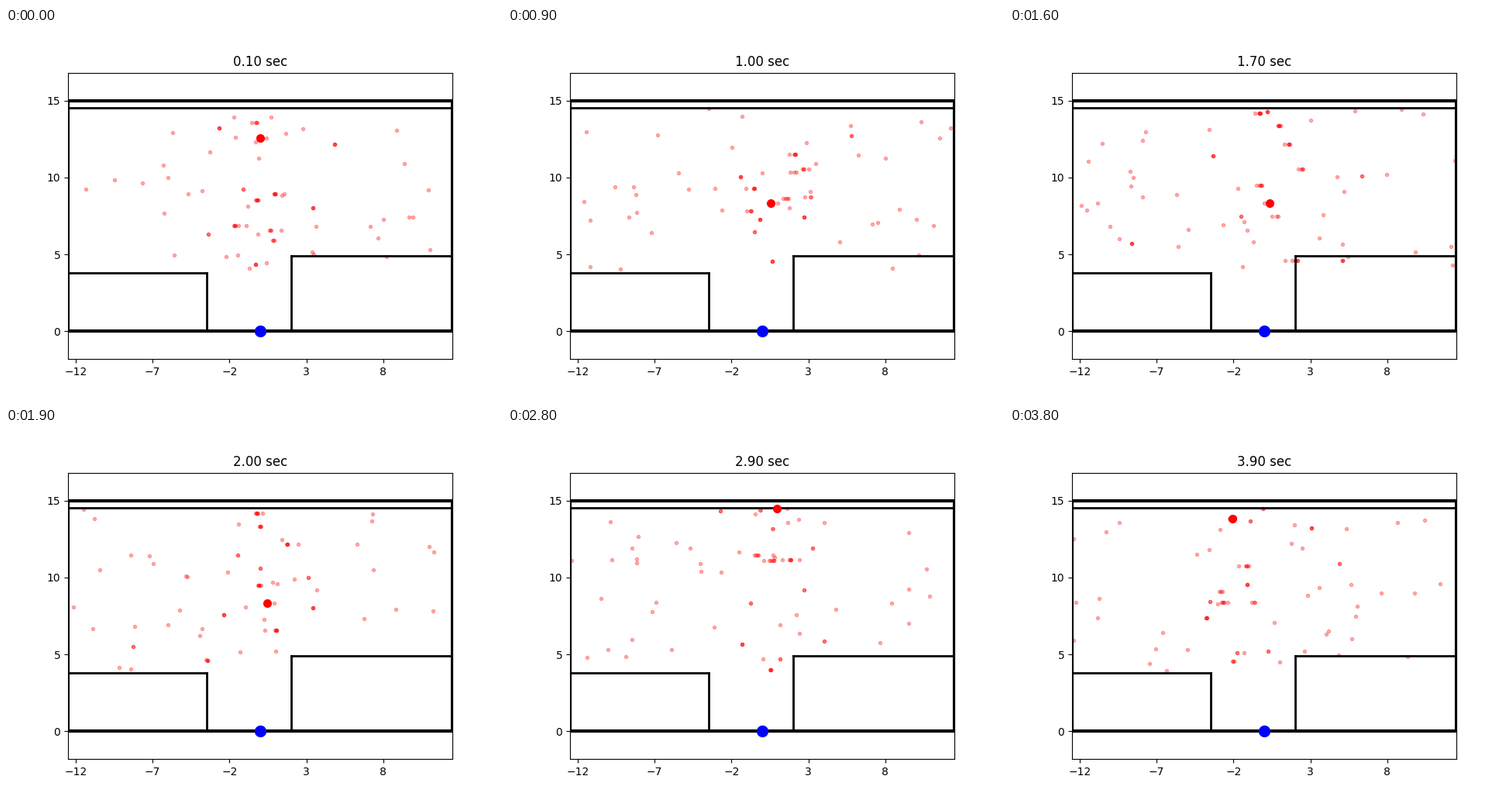
A matplotlib script for the animation above (3.9 s loop, 640x480 px).

```python
import numpy as np
import matplotlib.pyplot as plt
from matplotlib.animation import FuncAnimation

FRAMES = 39
INTERVAL = 100
HALF = 12.5
CEILING = 14.53
Y_LOW, Y_HIGH = 3.85, 14.5
SINGLES = 38
PAIRS = 6
GROUPS = 48

# Key points of the best estimate: frame, x, y
KEYS = np.array([
    (0, 0, 12.56),
    (9, 0.57, 8.33),
    (13, 0.22, 8.33),
    (19, 0.47, 8.33),
    (24, -1.8, 14.5),
    (32, 3.75, 9.87),
    (38, -2.05, 13.8),
])


def best_at(k):
    """Drift along x, but jump to the height of the nearest key."""
    frames, xs, ys = KEYS.T
    return np.interp(k, frames, xs), ys[np.abs(frames - k).argmin()]


def make_group(i, rng):
    """A resampled group keeps its height while it survives."""
    return {
        "birth": i * (FRAMES + 6) / GROUPS - 6,
        "life": rng.uniform(4, 10),
        "offset": rng.normal(0, 1),
        "y": rng.uniform(Y_LOW, Y_HIGH),
        "size": rng.integers(2, 7),
    }


seed_rng = np.random.default_rng(8)
groups = [make_group(i, seed_rng) for i in range(GROUPS)]


def particles_at(k):
    rng = np.random.default_rng(500 + k)
    best_x, best_y = best_at(k)

    # Fresh particles, scattered anew each frame
    xs = [rng.uniform(-HALF, HALF, SINGLES)]
    ys = [rng.uniform(Y_LOW, Y_HIGH, SINGLES)]

    # Coinciding copies
    copies = rng.integers(2, 4, PAIRS)
    xs.append(np.repeat(rng.normal(best_x, 3.5, PAIRS), copies))
    ys.append(np.repeat(rng.uniform(Y_LOW, Y_HIGH, PAIRS), copies))

    def add_group(x, y, size):
        spread = np.where(np.arange(size) % 3 == 2, 0.4, 0.05)
        xs.append(x + rng.normal(0, 1, size) * spread)
        ys.append(np.full(size, y))

    add_group(best_x, best_y, 4)
    for g in groups:
        if 0 <= k - g["birth"] < g["life"]:
            add_group(best_x + g["offset"], g["y"], g["size"])
    return np.concatenate(xs), np.concatenate(ys)


fig, ax = plt.subplots(figsize=(6.4, 4.8), dpi=100)
ax.set_xlim(-HALF, HALF)
ax.set_ylim(0, 15)
ax.set_aspect("equal", adjustable="datalim")
ax.set_xticks(range(-12, 13, 5))
ax.set_yticks(range(0, 16, 5))

dots, = ax.plot([], [], "r.", alpha=0.3)
ax.plot([-HALF, HALF, HALF, -HALF, -HALF], [0, 0, 15, 15, 0], "k", lw=3)
for wall_x, wall_y in [
    ([-HALF, HALF], [CEILING, CEILING]),
    ([-HALF, -3.5], [3.8, 3.8]),
    ([-3.5, -3.5], [0, 3.8]),
    ([2, HALF], [4.9, 4.9]),
    ([2, 2], [0, 4.9]),
]:
    ax.plot(wall_x, wall_y, "k", lw=2)
best, = ax.plot([], [], "ro", ms=7)
ax.plot(0, 0, "bo", ms=10)
ax.set_xlim(-HALF, HALF)
ax.set_ylim(0, 15)
title = ax.set_title("")


def update(k):
    dots.set_data(*particles_at(k))
    x, y = best_at(k)
    best.set_data([x], [y])
    title.set_text(f"{(k + 1) / 10:.2f} sec")
    return dots, best, title


anim = FuncAnimation(fig, update, frames=FRAMES, interval=INTERVAL, repeat=True)
plt.show()
```
